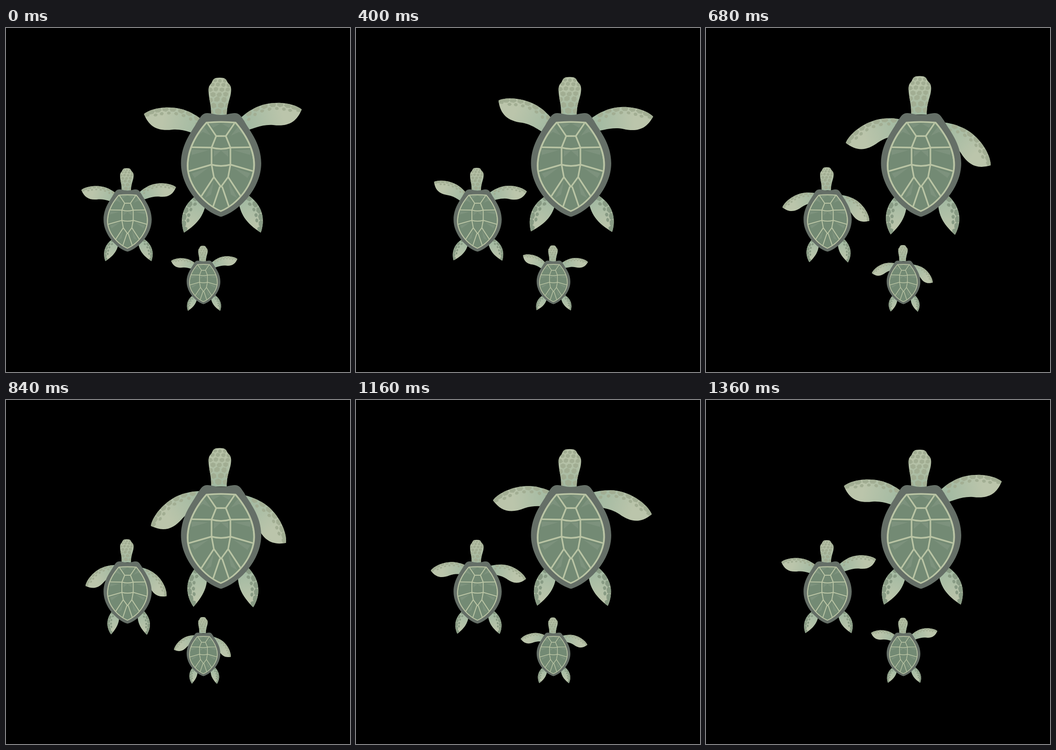
Write an HTML page with a canvas that moves like this. It is 748x748 px and loops after 1600 ms.

```html
<!DOCTYPE html>
<html lang="en">
<head>
<meta charset="utf-8">
<title>Swimming turtles</title>
<style>
  html, body { margin: 0; width: 100%; height: 100%; overflow: hidden; background: #000; }
  canvas { display: block; width: 100vw; height: 100vh; }
</style>
</head>
<body>
<canvas id="stage" width="748" height="748"></canvas>
<script>
const ctx = document.getElementById('stage').getContext('2d');
const LOOP = 1600, SWIM = 1360, STEP = 40;

// All shapes use the coordinates of the largest turtle; limbs are the left ones.
const headShape = new Path2D('M456 109Q465 107.500 473 109C480 111 480 117 484 121Q489.500 126 489.500 134C489.500 154 480 162 480 192H446C447 166 440 154 440.500 134Q440.500 126 446 121C449 117 449 111 456 109Z');
const shellShape = new Path2D('M467.500 189C480 189 488 185 497 185C508 185 511 192 518 202C527 220 555 250 555 294C555 350 505 400 467.500 410.500C430 400 380.500 350 380.500 294C380.500 250 408 220 417 202C424 192 427 185 438 185C447 185 455 189 467.500 189Z');
const rimShape = new Path2D('M435 204Q467 201 500 204C521 228 541.500 262 541.500 298C541 340 505 385 467 400C430 385 393 342 393 300C393 263 412 230 435 204Z');
const innerShape = new Path2D();
innerShape.addPath(rimShape, new DOMMatrix().translate(467, 301).scale(0.95, 0.965).translate(-467, -301));
// Left half of the seams between the plates, and its light streaks
const seams = new Path2D('M434 201L457 235H468M457 235L447 260V297L452 324L468 346M388 259L447 260Q457 263 468 263M388 314L447 297Q457 300 468 300M452 324L418 376M465 345L447 398');
const streaks = new Path2D('M443 208H466L450 217ZM416 234L430 214L446 234L428 226ZM402 264L440 266L404 276ZM452 266H468L452 280ZM404 316L440 304L410 326ZM432 370L452 332L446 362Z');

const front = {
  shape: new Path2D('M300 187C318 172 368 165 404 185Q422 194 440 212L432 236C405 230 388 219 362 221C330 225 311 215 300 187Z'),
  edge: [[300, 187], [320, 170], [385, 160], [425, 200]],
  fade: [418, 215, 340, 200], count: 8
};
const hind = {
  shape: new Path2D('M387 445C378 420 379 385 420 360L436 368C434 405 418 425 387 445Z'),
  edge: [[387, 445], [378, 420], [379, 385], [420, 360]],
  fade: [414, 372, 390, 430], count: 6
};

// Stroke angles in degrees at KNOTS; hind limbs follow the front strokes.
const KNOTS = [0, 200, 520, 680, 1000, 1160];
const leftStroke = t => swing([-10.9, -26.8, -13.3, 18.9, 25.7, 3.75], t) + 10.9;
const rightStroke = t => swing([-14.6, -35.3, 14.4, 36.9, 35.2, 14.4], t) + 14.6;
const limbs = [
  { ...front, pivot: [420, 211], turn: t => -leftStroke(t) },
  { ...front, pivot: [438, 223], turn: t => -rightStroke(t), mirror: [943, -10] },
  { ...hind, pivot: [415, 370], turn: t => -0.36 * leftStroke(t) },
  { ...hind, pivot: [423, 370], turn: t => -0.19 * leftStroke(t) - 0.07 * rightStroke(t), mirror: [941, 0] }
];

// Smooth periodic curve through the values
function swing(values, t) {
  const n = KNOTS.length;
  const time = i => KNOTS[(i + n) % n] + SWIM * Math.floor(i / n);
  const value = i => values[(i + n) % n];
  const slope = i => (value(i + 1) - value(i)) / (time(i + 1) - time(i));
  const tangent = i => {
    const before = time(i) - time(i - 1), after = time(i + 1) - time(i);
    return (after * slope(i - 1) + before * slope(i)) / (before + after);
  };
  t %= SWIM;
  let i = n - 1;
  while (KNOTS[i] > t) i--;
  const span = time(i + 1) - time(i), u = (t - time(i)) / span, v = 1 - u;
  return value(i) * v * v * (1 + 2 * u) + value(i + 1) * u * u * (3 - 2 * u)
    + span * u * v * (tangent(i) * v - tangent(i + 1) * u);
}

function bezier([a, b, c, d], u) {
  const v = 1 - u;
  return [0, 1].map(k => a[k] * v ** 3 + 3 * b[k] * v * v * u + 3 * c[k] * v * u * u + d[k] * u ** 3);
}

function gradient([x0, y0, x1, y1], from, to) {
  const g = ctx.createLinearGradient(x0, y0, x1, y1);
  g.addColorStop(0, from);
  g.addColorStop(1, to);
  return g;
}

function noise(n) {
  const s = Math.sin(n * 12.9898) * 43758.5453;
  return s - Math.floor(s);
}

function drawSpot(x, y, rx, ry, tilt, seed) {
  ctx.save();
  ctx.translate(x, y);
  ctx.rotate(tilt);
  ctx.beginPath();
  for (let i = 0; i < 6; i++) {
    const a = (i + 0.6 * noise(seed + 3)) * Math.PI / 3;
    const r = 0.85 + 0.25 * noise(seed * 7 + i);
    ctx.lineTo(rx * r * Math.cos(a), ry * r * Math.sin(a));
  }
  ctx.closePath();
  ctx.fill();
  ctx.restore();
}

// Two rows of spots along the leading edge, from tip to base
function drawEdgeSpots(edge, count) {
  for (let row = 0; row < 2; row++) {
    for (let i = row; i < count; i++) {
      const u = (i + 0.5 + row * 0.45) / count;
      const [x, y] = bezier(edge, u), [x2, y2] = bezier(edge, u + 0.01);
      const tilt = Math.atan2(y2 - y, x2 - x);
      const inset = row ? 13 : 4;
      const rx = row ? 4.5 : 8, ry = row ? 3.8 : 6;
      drawSpot(x - inset * Math.sin(tilt), y + inset * Math.cos(tilt), rx, ry, tilt, i + row * 20);
    }
  }
}

function drawLimb({ shape, edge, fade, count, pivot, turn, mirror }, t) {
  ctx.save();
  if (mirror) {
    ctx.translate(...mirror);
    ctx.scale(-1, 1);
  }
  ctx.translate(...pivot);
  ctx.rotate(turn(t) * Math.PI / 180 * (shape === hind.shape ? 1 : 1));
  ctx.translate(-pivot[0], -pivot[1]);
  ctx.fillStyle = gradient(fade, '#a3baa2', '#bbc5ab');
  ctx.fill(shape);
  ctx.clip(shape);
  ctx.fillStyle = gradient(fade, '#889b84', '#a2ae93');
  drawEdgeSpots(edge, count);
  ctx.restore();
}

function drawHead(t) {
  ctx.save();
  ctx.translate(0, -1.9 + 1.9 * Math.cos(2 * Math.PI * (t - 90) / SWIM));
  ctx.fillStyle = gradient([463, 130, 468, 188], '#b8c3a8', '#a2b9a1');
  ctx.fill(headShape);
  ctx.clip(headShape);
  ctx.fillStyle = gradient([465, 115, 465, 185], '#a2ae93', '#82987f');
  for (let row = 0, y = 114; row < 7; row++) {
    const size = 4.8 + row * 0.5;
    for (let x = 444 + (row % 2) * size; x < 488; x += size * 2.2) {
      drawSpot(x, y + 2 * noise(x), size, size * 0.9, 0, row * 9 + x);
    }
    y += size * 1.85;
  }
  ctx.restore();
}

function drawShell() {
  ctx.fillStyle = '#656f67';
  ctx.fill(shellShape);
  ctx.fillStyle = '#b9c4a4';
  ctx.fill(rimShape);
  ctx.save();
  ctx.clip(innerShape);
  ctx.fillStyle = '#738a74';
  ctx.fill(innerShape);
  ctx.fillStyle = 'rgba(160,172,154,.22)';
  ctx.strokeStyle = '#b9c4a4';
  ctx.lineWidth = 3.4;
  ctx.lineJoin = 'round';
  for (let side = 0; side < 2; side++) {
    ctx.fill(streaks);
    ctx.stroke(seams);
    ctx.translate(935, 0);
    ctx.scale(-1, 1);
  }
  ctx.restore();
}

function drawTurtle(x, y, size, t) {
  ctx.setTransform(size, 0, 0, size, x, y);
  limbs.forEach(limb => drawLimb(limb, t));
  drawHead(t);
  drawShell();
}

function render(now) {
  const t = Math.min(SWIM, Math.floor(now % LOOP / STEP) * STEP);
  ctx.setTransform(1, 0, 0, 1, 0, 0);
  ctx.fillStyle = '#000';
  ctx.fillRect(0, 0, 748, 748);
  drawTurtle(0, 0, 1, t);
  drawTurtle(-16.2, 240, 0.6, t);
  drawTurtle(233, 428, 0.42, t);
}

let start;
function tick(now) {
  start ??= now;
  render(now - start);
  requestAnimationFrame(tick);
}
render(0);
requestAnimationFrame(tick);
</script>
</body>
</html>
```
